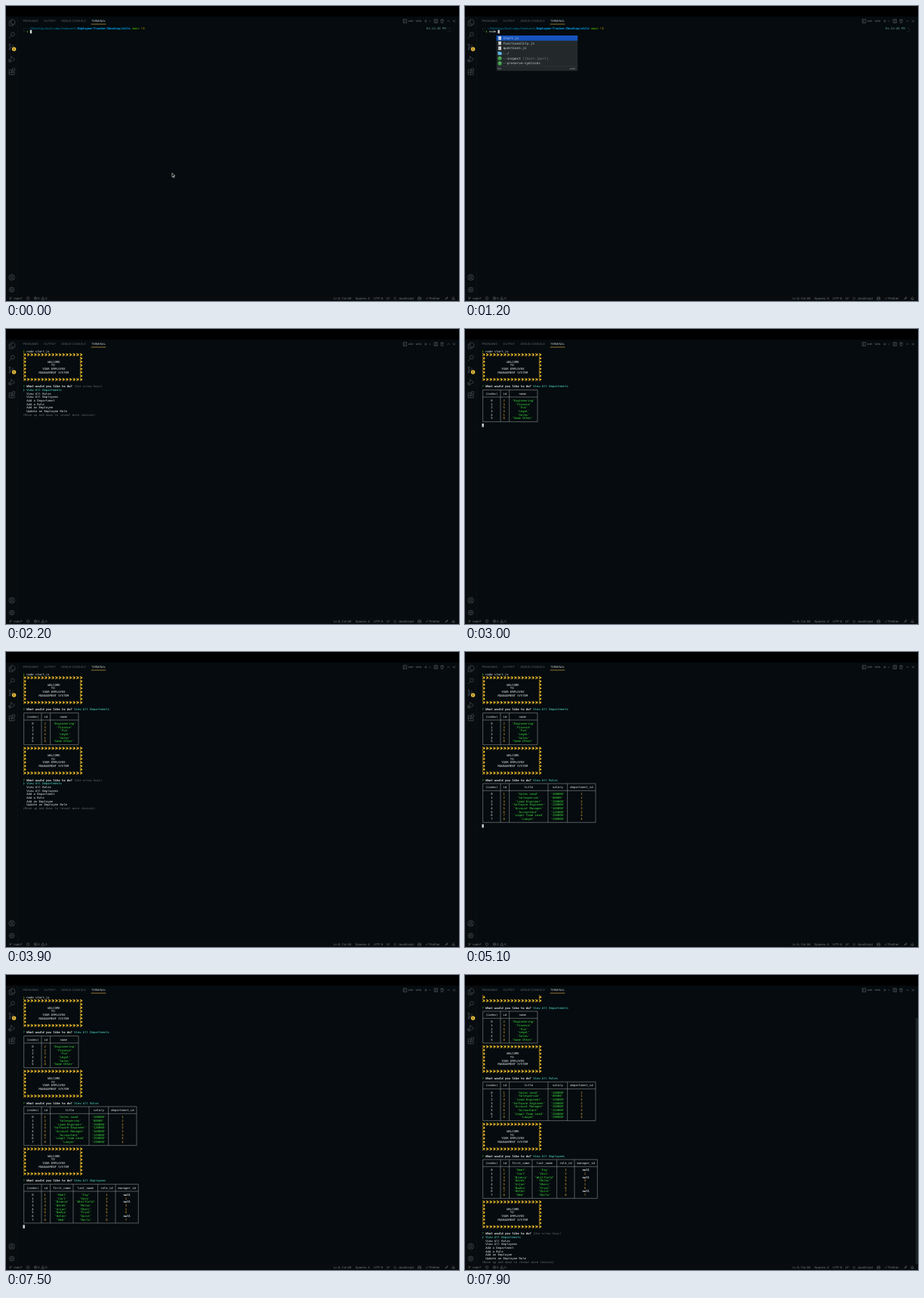
Animation, 600 px wide and 390 px high, one loop 8000 ms. Source, as an HTML page with a canvas:

```html
<!DOCTYPE html>
<html lang="en">
<head>
<meta charset="utf-8">
<title>Employee management terminal</title>
<style>
  html, body { margin: 0; width: 100%; height: 100%; overflow: hidden; background: #000; }
  canvas { display: block; width: 600px; height: 390px; }
</style>
</head>
<body>
<canvas id="stage"></canvas>
<script>
const LOOP = 8000;
const COL = 7 / 3, ROW = 14 / 3, LEFT = 22.5, TOP = 29.3;
const MONO = '"DejaVu Sans Mono", monospace', SANS = 'Inter, sans-serif';
const C = {
  white: '#e4e6e6', dim: '#666b6c', faint: '#394145', cyan: '#55dfcf', green: '#3fdc3f',
  amber: '#eda93a', star: '#f3c02c', border: '#a4a8a8', icon: '#4a5157', label: '#737a7f', bg: '#050b0e'
};

const canvas = document.getElementById('stage');
const dpr = window.devicePixelRatio || 1;
canvas.width = 600 * dpr;
canvas.height = 390 * dpr;
const ctx = canvas.getContext('2d');

// ---------- drawing helpers ----------
function text(str, x, y, color, size, font = SANS, weight = 'normal') {
  ctx.save();
  ctx.translate(x, y + size * 0.36);
  ctx.scale(size / 100, size / 100);
  ctx.textRendering = 'geometricPrecision';
  ctx.font = `${weight} 100px ${font}`;
  ctx.fillStyle = color;
  ctx.fillText(str, 0, 0);
  ctx.restore();
}
function rect(x, y, w, h, color) {
  ctx.fillStyle = color;
  ctx.fillRect(x, y, w, h);
}
function disc(x, y, r, color) {
  ctx.fillStyle = color;
  ctx.beginPath();
  ctx.arc(x, y, r, 0, 7);
  ctx.fill();
}
function stroke(path, color, x = 0, y = 0, width = 0.6) {
  ctx.save();
  ctx.translate(x, y);
  ctx.strokeStyle = color;
  ctx.lineWidth = width;
  ctx.stroke(new Path2D(path));
  ctx.restore();
}
const circle = r => `M${r} 0A${r} ${r} 0 1 1 ${-r} 0A${r} ${r} 0 1 1 ${r} 0`;
const colX = col => LEFT + col * COL;
const rowY = row => TOP + row * ROW;
function cell(str, col, row, color = C.white, bold = false) {
  text(str, colX(col), rowY(row), color, COL / 0.602, MONO, bold ? 'bold' : 'normal');
}
function block(col, row) {
  rect(colX(col), rowY(row) - 2.3, COL, 4.6, '#d4d8d8');
}

// ---------- editor chrome ----------
const ICONS = [
  [7.8, 22, 'M-1-4H2L4-2V2H-1ZM-1-2H-3.5V4H1.5V2'],
  [7.8, 38.3, 'M3.5-1A2.4 2.4 0 1 1-1.3-1A2.4 2.4 0 1 1 3.5-1M-.6.8L-3.6 4'],
  [7, 54, 'M-2-2V2M-2-4A1 1 0 1 1-2-2A1 1 0 1 1-2-4M-2 2A1 1 0 1 1-2 4A1 1 0 1 1-2 2M2-3V-1Q2 1-2 1'],
  [7.6, 70.5, 'M-1-4L4 0L0 2.6M-1-4V0M-1 2A1.5 1.5 0 1 1-4 2A1.5 1.5 0 1 1-1 2M-4 0L-1 4'],
  [7.6, 86.8, 'M-3.5-2.5H0V4H-3.5ZM-3.5.8H3.5V4H0M1-4H4V-1H1Z'],
  [7.6, 358.8, circle(3.8) + 'M1.4-.8A1.4 1.4 0 1 1-1.4-.8A1.4 1.4 0 1 1 1.4-.8M-2.6 2.6Q0-.4 2.6 2.6'],
  [7.6, 375, circle(2.8) + circle(1) + 'M0-4V-3M0 3V4M-4 0H-3M3 0H4M-3-3L-2-2M2 2L3 3M-3 3L-2 2M2-2L3-3']
];
const TABS = [['PROBLEMS', 22.5], ['OUTPUT', 50.3], ['DEBUG CONSOLE', 73.5]];
const STATUS = [
  ['main*', 10.3], ['0', 42], ['0', 52], ['Ln 6, Col 46', 434], ['Spaces: 4', 462.5], ['UTF-8', 487],
  ['LF', 504], ['{}', 513.6], ['JavaScript', 519.6], ['Prettier', 560.5]
];
const SMALL_ICONS = [
  [528.5, 20, 'M-2.3-2.3H2.3V2.3H-2.3ZM-1.3-1L0 0L-1.3 1'],
  [556, 20, 'M-1.6 0H1.6M0-1.6V1.6'],
  [561.5, 20, 'M-1-.5L0 .5L1-.5'],
  [569.3, 20, 'M-2.2-2.2H2.2V2.2H-2.2ZM0-2.2V2.2'],
  [577.6, 20, 'M-2-1.6H2M-1.5-1.6L-1.2 2.2H1.2L1.5-1.6M-.6-2.3H.6'],
  [586, 20, 'M-1.5.8L0-.8L1.5.8'],
  [593.5, 20, 'M-1.4-1.4L1.4 1.4M-1.4 1.4L1.4-1.4'],
  [6.3, 386.4, 'M-1-1.8V2M1-1.6V-.8Q1 .4-1 .6'],
  [29, 386.4, circle(1.7)],
  [39, 386.4, circle(1.7) + 'M-.7-.7L.7.7M-.7.7L.7-.7'],
  [48.8, 386.4, 'M0-1.8L2 1.7H-2Z'],
  [547.7, 386.4, 'M-2 0Q-2-1.8 0-1.8Q2-1.8 2 0V1.7H-2ZM-2 0H2'],
  [557.6, 386.4, 'M-1.4 0L-.4 1.2L1.5-1.4'],
  [583, 386.4, 'M-1.6 1.8L0 0L1.6-1.8V.4H-1'],
  [592.5, 386.4, 'M-1.8 1.2H1.8L1.2.2V-.6Q0-2.8-1.2-.6V.2ZM-.5 1.9H.5']
];

function drawChrome() {
  rect(0, 0, 600, 390, C.bg);
  rect(0, 0, 600, 14, '#000');
  rect(0, 14, 15.5, 368, '#080c0f');
  rect(15.2, 14, 0.5, 368, '#10171b');
  rect(0, 382, 600, 8, '#080c0f');
  for (const [x, y, path] of ICONS) stroke(path, C.icon, x, y, 0.7);
  disc(10.6, 57, 2.7, '#e2b93c');
  rect(10.3, 55.6, 0.7, 2.8, '#4b3c10');
  for (const [label, x] of TABS) text(label, x, 20, '#62686c', 3.75);
  text('TERMINAL', 113, 20, '#c9cccd', 3.75);
  rect(112.7, 23.6, 19.6, 0.8, '#b3903d');
  text('zsh - utils', 532.8, 20, C.label, 3.8);
  for (const [label, x] of STATUS) text(label, x, 386.5, C.label, 4.1);
  for (const [x, y, path] of SMALL_ICONS) stroke(path, C.label, x, y, 0.5);
}

// ---------- terminal pieces ----------
function sparkle(col, row) {
  const x = colX(col), y = rowY(row);
  ctx.save();
  ctx.translate(x + 2.7, y);
  ctx.fillStyle = C.star;
  ctx.fill(new Path2D('M0-2Q.3-.3 1.8 0Q.3.3 0 2Q-.3.3-1.8 0Q-.3-.3 0-2'));
  ctx.restore();
  disc(x + 1.2, y - 1.4, 0.6, C.star);
  disc(x + 1.2, y + 1.4, 0.6, C.star);
}
function banner(row) {
  for (let col = 0; col <= 32; col += 2) {
    sparkle(col, row);
    sparkle(col, row + 7);
  }
  for (let i = 1; i < 7; i++) {
    sparkle(0, row + i);
    sparkle(32, row + i);
  }
  cell('WELCOME', 14, row + 2);
  cell('TO', 16, row + 3);
  cell('YOUR EMPLOYEE', 11, row + 4);
  cell('MANAGEMENT SYSTEM', 9, row + 5);
}

const CHOICES = ['View All Departments', 'View All Roles', 'View All Employees', 'Add a Department',
  'Add a Role', 'Add an Employee', 'Update an Employee Role'];

function question(row, tail, color) {
  cell('?', 0, row, C.green);
  cell('What would you like to do?', 2, row, C.white, true);
  cell(tail, 29, row, color);
}
function menu(row, selected, hint) {
  question(row, hint ? '(Use arrow keys)' : '', C.dim);
  CHOICES.forEach((choice, i) => {
    const active = i === selected;
    if (active) cell('❯', 0, row + 1 + i, C.cyan);
    cell(choice, 2, row + 1 + i, active ? C.cyan : C.white);
  });
  cell('(Move up and down to reveal more choices)', 0, row + 8, C.dim);
}

const show = v => typeof v === 'string' ? `'${v}'` : String(v);
const tint = v => typeof v === 'string' ? C.green : v === null ? C.white : C.amber;

function table(row, { head, rows }) {
  const widths = head.map((h, i) => 2 + Math.max(h.length, ...rows.map(r => show(r[i]).length)));
  const edges = [0];
  widths.forEach((w, i) => edges.push(edges[i] + w + 1));
  const put = (str, i, r, color, bold) =>
    cell(str, edges[i] + 1 + Math.floor((widths[i] - str.length) / 2), r, color, bold);

  const mid = col => colX(col + 0.5);
  const last = row + rows.length + 3;
  let path = '';
  for (const r of [row, row + 2, last]) path += `M${mid(0)} ${rowY(r)}H${mid(edges.at(-1))}`;
  for (const e of edges) path += `M${mid(e)} ${rowY(row)}V${rowY(last)}`;
  stroke(path, C.border, 0, 0, 0.5);

  head.forEach((h, i) => put(h, i, row + 1, C.white));
  rows.forEach((values, n) => values.forEach((v, i) =>
    put(show(v), i, row + 3 + n, i ? tint(v) : C.white, v === null)));
}
const numbered = (head, rows) => ({ head: ['(index)', ...head], rows: rows.map((r, i) => [i, ...r]) });

const DEPARTMENTS = numbered(['id', 'name'], [
  [2, 'Engineering'], [3, 'Finance'], [5, 'Fun'], [4, 'Legal'], [1, 'Sales'], [8, 'Some Other']
]);
const ROLES = numbered(['id', 'title', 'salary', 'department_id'], [
  [1, 'Sales Lead', '100000', 1], [2, 'Salesperson', '80000', 1],
  [3, 'Lead Engineer', '150000', 2], [4, 'Software Engineer', '120000', 2],
  [5, 'Account Manager', '160000', 3], [6, 'Accountant', '125000', 3],
  [7, 'Legal Team Lead', '250000', 4], [8, 'Lawyer', '190000', 4]
]);
const EMPLOYEES = numbered(['id', 'first_name', 'last_name', 'role_id', 'manager_id'], [
  [1, 'Noel', 'Fay', 1, null], [2, 'Carl', 'Voss', 2, 1],
  [3, 'Bianca', 'Whitfield', 3, null], [4, 'Derek', 'Molas', 4, 3],
  [5, 'Arjan', 'Dheri', 5, 1], [6, 'Nadia', 'Frost', 6, 5],
  [7, 'Helen', 'Quist', 7, null], [8, 'Ned', 'Harlo', 8, 7]
]);

// ---------- shell prompt and completion popup ----------
const KEY_TIMES = [500, 600, 700, 800, 1000];

function prompt(t) {
  const typed = t >= 1300 ? 'node start.js' : 'node '.slice(0, KEY_TIMES.filter(k => t >= k).length);
  cell('╭─', 0, 0, C.faint);
  cell('~/Desktop/bootcamp/homework/', 3, 0, '#0087af');
  cell('Employee-Tracker/Develop/utils', 31, 0, '#00afff', true);
  cell('main', 62, 0, '#5fd700');
  cell('!3', 67, 0, '#d7af00');
  cell('01:12:48 PM', 229, 0, '#5fa38b');
  cell('─╮', 241, 0, C.faint);
  cell('╰─', 0, 1, C.faint);
  cell('❯', 2, 1, '#5fd700');
  cell(typed, 4, 1);
  cell('─╯', 241, 1, C.faint);
  block(4 + typed.length, 1);
}

function popup() {
  const size = 4.32, pitch = 6.65;
  rect(41.7, 39, 107.5, 46.8, '#23292b');
  rect(41.7, 39, 107.5, 6.8, '#1553bd');
  ['start.js', 'functionality.js', 'questions.js', '../', '--inspect', '--preserve-symlinks'].forEach((name, i) => {
    const y = 42.5 + i * pitch;
    text(name, 50.5, y, '#d2d5d5', size, MONO);
    if (i < 3) {
      rect(44.3, y - 2.3, 3.6, 4.6, '#e3e5e5');
      rect(45, y - 0.6, 2.2, 0.4, '#8a9092');
      rect(45, y + 0.6, 2.2, 0.4, '#8a9092');
    } else if (i === 3) {
      rect(43.6, y - 2.2, 2.2, 1, '#4fa9dd');
      rect(43.6, y - 1.6, 5, 3.8, '#62bcec');
    } else {
      disc(46.1, y, 2.7, '#3d9a46');
      text('?', 45.1, y, '#d8f0d8', 3.6, MONO);
    }
  });
  text('[[host:]port]', 76.5, 42.5 + 4 * pitch, '#7d8385', size, MONO);
  rect(41.7, 79, 107.5, 0.4, '#363d40');
  text('file', 43.3, 82.5, '#a5aaab', 3.4);
  text('cmd', 138.5, 82.5, '#a5aaab', 3.4);
}

function pointer() {
  ctx.save();
  ctx.translate(220, 220.8);
  const arrow = new Path2D('M0 0V5.4L1.3 4.2L2.2 6.2L3.1 5.8L2.2 3.9H4Z');
  ctx.fillStyle = '#000';
  ctx.fill(arrow);
  ctx.restore();
  stroke('M0 0V5.4L1.3 4.2L2.2 6.2L3.1 5.8L2.2 3.9H4Z', '#eee', 220, 220.8, 0.6);
}

// ---------- session: each step shows a menu, then its answer and table ----------
const STEPS = [
  { row: 1, open: 1900, moves: [], enter: 2500, result: 2700, data: DEPARTMENTS },
  { row: 21, open: 3900, moves: [4200], enter: 4500, result: 4500, data: ROLES },
  { row: 43, open: 5600, moves: [5900, 6500], enter: 6700, result: 6700, data: EMPLOYEES },
  { row: 65, open: 7800, moves: [], enter: Infinity }
];

function session(t) {
  cell('❯', 0, 0, '#5fd700');
  cell('node start.js', 2, 0);
  let cursorRow = 1;
  for (const step of STEPS) {
    if (t < step.open) break;
    const ask = step.row + 9;
    const selected = step.moves.filter(m => t >= m).length;
    banner(step.row);
    if (t < step.enter) {
      menu(ask, selected, selected === 0);
      return;
    }
    question(ask, CHOICES[selected], C.cyan);
    cursorRow = ask + 1;
    if (t >= step.result) {
      table(ask + 1, step.data);
      cursorRow += step.data.rows.length + 4;
    }
  }
  block(0, cursorRow);
}

function draw(t) {
  ctx.setTransform(dpr, 0, 0, dpr, 0, 0);
  drawChrome();
  if (t < 1700) {
    prompt(t);
    if (t >= 1100 && t < 1300) popup();
    if (t < 500) pointer();
    return;
  }
  const scrolled = t >= STEPS[3].open;
  ctx.save();
  ctx.beginPath();
  ctx.rect(16, 26.5, 584, 355.5);
  ctx.clip();
  if (scrolled) ctx.translate(0, -7 * ROW);
  session(t);
  ctx.restore();
  if (scrolled) rect(596.8, 57, 3.2, 325, '#1b2225');
}

function tick() {
  draw(performance.now() % LOOP);
  requestAnimationFrame(tick);
}
tick();
</script>
</body>
</html>
```
